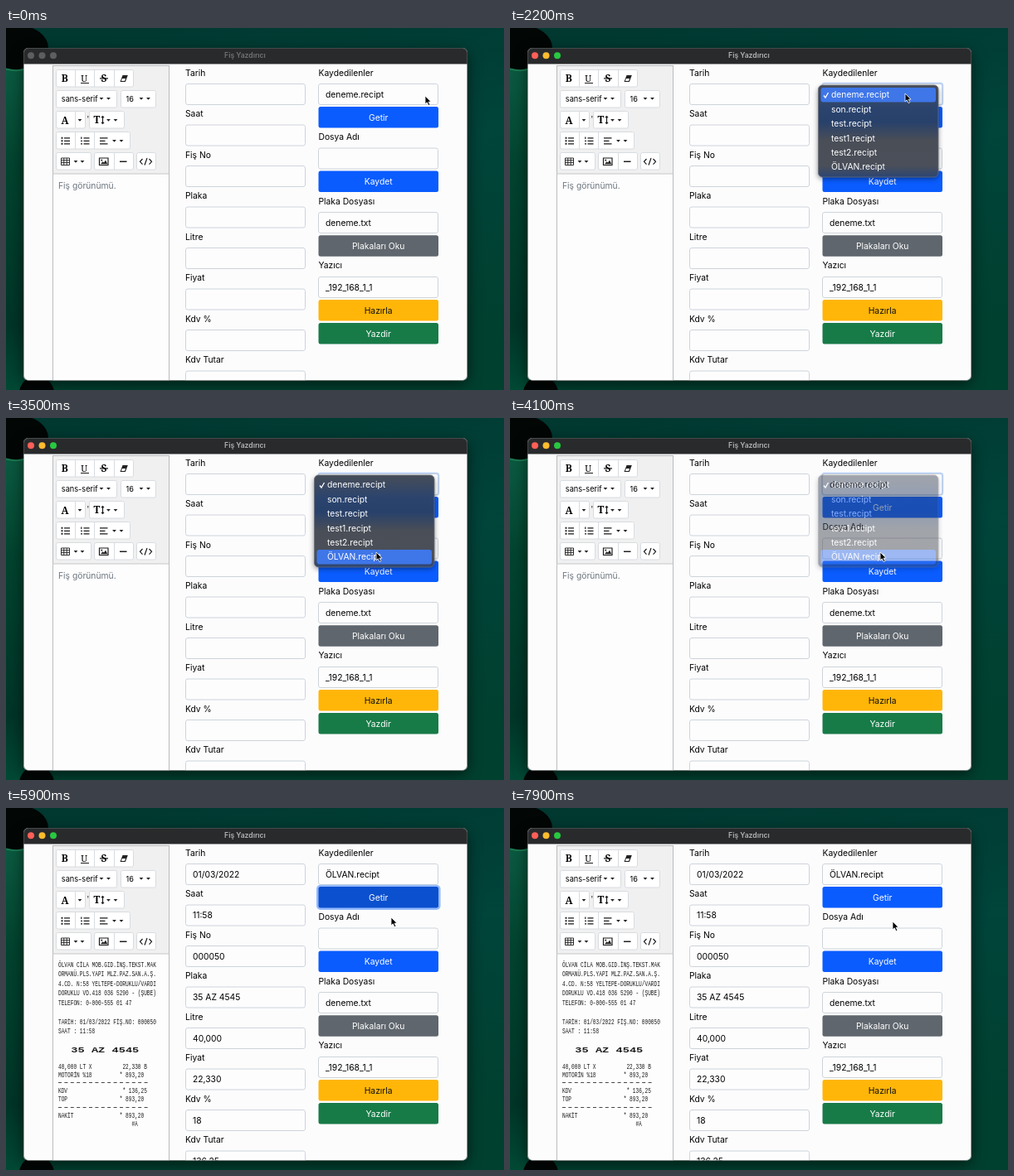
Recreate the animation shown at these times as an HTML page. Size 600 by 437 pixels, loop 8 s.

```html
<!DOCTYPE html>
<html lang="tr">
<head>
<meta charset="utf-8">
<style>
  html, body { margin: 0; width: 100%; height: 100%; overflow: hidden; background: #013a30; }
  svg { display: block; font: 10.3px Inter, sans-serif; }
  .field { fill: #fdfdfe; stroke: #ced4da; }
  .tool { fill: #fff; stroke: #d8dce0; }
  .icon { fill: none; stroke: #1c1c1c; stroke-width: 1.2; }
  .serif { font: bold 12px "Noto Serif", serif; }
  .receipt { font: 8.3px "Liberation Mono", monospace; fill: #1c1c1c; white-space: pre; }
</style>
</head>
<body>
<svg id="stage" width="600" height="437" viewBox="0 0 600 437"></svg>
<script>
const text = (x, y, s, attrs = '') => `<text x="${x}" y="${y}" ${attrs}>${s}</text>`;
const rect = (x, y, w, h, attrs = '') => `<rect x="${x}" y="${y}" width="${w}" height="${h}" ${attrs}/>`;
const path = (d, attrs = 'class="icon"') => `<path d="${d}" ${attrs}/>`;
const field = (x, y, value = '', id = '') =>
  rect(x + .5, y + .5, 144, 25, 'class="field" rx="2.5"') + text(x + 9, y + 16.7, value, id && `id="${id}"`);
const button = (y, label, fill, ink = '#fff', id = '') =>
  rect(376.5, y, 144.5, 25.5, `rx="2.5" fill="${fill}" ${id && `id="${id}"`}`) +
  text(448.7, y + 16.5, label, `fill="${ink}" text-anchor="middle"`);
const tools = (x, y, w, dividers = []) => rect(x + .5, y + .5, w, 20.5, 'class="tool" rx="2"') +
  dividers.map(d => path(`M${d + .5} ${y + .5}v20.5`, 'stroke="#d8dce0"')).join('');
const caret = (x, y) => path(`M${x - 2.4} ${y - 1}h4.8l-2.4 2.7z`, 'fill="#222"');

const background = `
  <defs>
    <linearGradient id="wall" x2=".25" y2="1">
      <stop stop-color="#01372f"/><stop offset=".5" stop-color="#00443a"/><stop offset="1" stop-color="#00402f"/>
    </linearGradient>
    <linearGradient id="strip" x2="0" y2="1">
      <stop stop-color="#0b5a41"/><stop offset=".3" stop-color="#02442f"/>
      <stop offset=".8" stop-color="#003527"/><stop offset="1" stop-color="#014934"/>
    </linearGradient>
    <linearGradient id="glass" x2="0" y2="1">
      <stop stop-color="#474d58"/><stop offset=".25" stop-color="#2b446e"/><stop offset=".4" stop-color="#28416b"/>
      <stop offset=".6" stop-color="#494e57"/><stop offset=".88" stop-color="#4a4f59"/><stop offset="1" stop-color="#2c4574"/>
    </linearGradient>
    <filter id="shadow" x="-20%" y="-20%" width="140%" height="140%"><feGaussianBlur stdDeviation="9"/></filter>
    <filter id="soft" x="-20%" y="-20%" width="140%" height="140%"><feGaussianBlur stdDeviation="3"/></filter>
    <clipPath id="frame">${rect(21, 24, 535, 401.5, 'rx="6"')}</clipPath>
  </defs>
  ${rect(0, 0, 600, 437, 'fill="url(#wall)"')}
  ${rect(0, 48, 24, 389, 'fill="url(#strip)"')}
  <ellipse cx="15" cy="24" rx="36" ry="27" fill="#020605"/>
  ${path('M0 49.5Q14 53 24 49', 'fill="none" stroke="#1c7a52" stroke-width="2"')}
  <circle cx="37" cy="441" r="21" fill="#020605"/>
  ${rect(21, 30, 535, 400, 'rx="8" fill="#000" opacity=".55" filter="url(#shadow)"')}`;

const titleBar = rect(21, 24, 535, 19.5, 'fill="#292a2c"') +
  [30, 43.5, 57].map(x => `<circle class="light" cx="${x}" cy="33.3" r="4"/>`).join('') +
  text(288, 36.4, 'Fiş Yazdırıcı', 'id="title" text-anchor="middle" font-size="8.6" font-weight="600"');

const bars = (x, y, w, last = w) => path(`M${x} ${y - 3.5}h${w}M${x} ${y}h${last}M${x} ${y + 3.5}h${w}`);
const editor =
  rect(56.5, 45.5, 140, 390, 'fill="#fdfdfe" stroke="#b9bbbd"') +
  rect(57, 46, 139, 130, 'fill="#f0f0f1"') + path('M56 176h141', 'stroke="#c4c6c8"') +
  tools(60, 50, 93, [83, 106, 130]) + tools(60, 75, 73) + tools(138, 75, 42) +
  tools(60, 100, 35, [83]) + tools(100, 100, 42) + tools(60, 125, 89, [83, 106]) +
  tools(60, 150, 42) + tools(106, 150, 47, [130]) + tools(157, 150, 23) +
  text(66.8, 65, 'B', 'class="serif"') +
  text(90.3, 64.5, 'U', 'class="serif" style="font-weight:500;font-size:11px"') + path('M90 66.5h10') +
  text(114.5, 65, 'S', 'class="serif"') + path('M113 60.8h10') +
  path('M140.5 57h6.3l-3 8h-6.3z', 'fill="#222"') + path('M139.5 62.3l.5-1.4h4l-1 3.1h-4z', 'fill="#fff"') +
  text(66.8, 88.7, 'sans-serif', 'font-size="9.2"') + text(144.5, 88.7, '16', 'font-size="9.2"') +
  text(66.5, 115.5, 'A', 'class="serif"') + text(97.6, 113, "'", 'font-size="9"') +
  text(105.5, 115, 'T', 'class="serif"') + path('M116.5 107v8M115 108.2l1.5-1.6 1.5 1.6M115 113.8l1.5 1.6 1.5-1.6') +
  bars(70, 136.3, 7) + path('M66.5 132.8h2M66.5 136.3h2M66.5 139.8h2', 'stroke="#222" stroke-width="2"') +
  bars(93.5, 136.3, 7) + path('M90.8 131.5v2.6M90 136.3h2M90 139.8h2') +
  bars(113, 136.3, 9.5, 6.5) +
  path('M66.5 157h10v8.5h-10zM66.5 159.8h10M66.5 162.6h10M69.8 157v8.5M73.2 157v8.5', 'class="icon" style="stroke-width:.9"') +
  path('M112.5 157h10.5v8.5h-10.5z') + path('M114 164.3l2.5-3 1.5 1.3 2-3 2.3 4.7zM114.4 158.8h1.8v1.8h-1.8z', 'fill="#222"') +
  path('M137 161.3h8.5', 'stroke="#222" stroke-width="1.6"') +
  path('M164.5 158l-3 3.3 3 3.3M172.5 158l3 3.3-3 3.3M170 157l-3 8.5') +
  [[115, 85], [123.5, 85], [163, 85], [171.5, 85], [89, 111], [123.5, 111], [132, 111],
   [130.5, 136], [139, 136], [84, 161], [92, 161]].map(p => caret(...p)).join('');

const headLines = ['ÖLVAN CİLA MOB.GID.İNŞ.TEKST.MAK', 'ORMANÜ.PLS.YAPI MLZ.PAZ.SAN.A.Ş.',
  '4.CD. N:58 YELTEPE-DORUKLU/VARDI', 'DORUKLU VD.418 036 5290 - (ŞUBE)', ' TELEFON: 0-000-555 01 47', '',
  'TARİH: 01/03/2022 FİŞ.NO: 000050', 'SAAT : 11:58'];
const sums = [[315, '40,000 LT X', '22,330 B', 29], [325, 'MOTORİN %18', '* 893,20', 28], [344.5, 'KDV', '* 136,25', 29],
  [354.5, 'TOP', '* 893,20', 28], [374, 'NAKİT', '* 893,20', 28], [384, '', '#A', 26]];
const receipt = `<g id="receipt"><g class="receipt" transform="translate(63) scale(.74 1)">
  ${headLines.map((s, i) => text(0, 192 + i * 11.5, s)).join('')}
  ${sums.map(([y, label, value, end]) => text(0, y, label) + text(end * 4.98, y, value, 'text-anchor="end"')).join('')}</g>
  <g class="receipt" transform="translate(78.3) scale(1.52 1)">${text(0, 295, '35 AZ 4545', 'style="font-size:9px;font-weight:bold"')}</g>
  ${path('M63 331.5h108M63 361.5h108', 'stroke="#333" stroke-width=".9" stroke-dasharray="4 3.4"')}</g>`;

const fields = [['Tarih', '01/03/2022'], ['Saat', '11:58'], ['Fiş No', '000050'], ['Plaka', '35 AZ 4545'],
  ['Litre', '40,000'], ['Fiyat', '22,330'], ['Kdv %', '18'], ['Kdv Tutar', '136,25']];
const form = fields.map(([label, value], i) =>
  text(216, 57.6 + i * 49.5, label) + field(216, 67 + i * 49.5, value, `value${i}`)).join('');

const blue = '#0a5cff';
const side = ['Kaydedilenler', 'Dosya Adı', 'Plaka Dosyası', 'Yazıcı'].map((s, i) => text(376.5, 57.6 + i * 77.6, s)).join('') +
  rect(375.2, 65.7, 147, 28, 'id="selectRing" rx="4" fill="#b5d0fd"') +
  field(376, 67, 'deneme.recipt', 'choice') +
  rect(374, 92.7, 149.5, 30.2, 'id="buttonRing" rx="5" fill="#93b9fb"') +
  button(95, 'Getir', blue, '#fff', 'fetch') + field(376, 144.5) + button(172.6, 'Kaydet', blue) +
  field(376, 222, 'deneme.txt') + button(250.2, 'Plakaları Oku', '#5f666d') +
  field(376, 300, '_192_168_1_1') + button(328, 'Hazırla', '#ffb608', '#111') + button(356, 'Yazdir', '#177b47');

const options = ['deneme', 'son', 'test', 'test1', 'test2', 'ÖLVAN'].map(s => s + '.recipt');
const popup = `<g id="popup">
  ${rect(371, 72, 145, 110, 'rx="5" opacity=".45" filter="url(#soft)"')}
  ${rect(371.5, 69, 144.5, 111, 'rx="5" fill="url(#glass)" stroke="#686d76" stroke-width=".8"')}
  ${rect(374.5, 0, 138.5, 17.4, 'id="highlight" rx="3" fill="#3f76e8"')}
  ${path('M378 81.5l2 2.5 3.5-6', 'fill="none" stroke="#fff" stroke-width="1.3"')}
  ${options.map((s, i) => text(387, 84.4 + i * 17.4, s, 'fill="#fff"')).join('')}</g>`;

const cursor = path('M0 0v9.8l2.3-2 1.7 3.8 1.8-.8-1.7-3.7h3z', 'id="cursor" stroke="#fff" stroke-width=".8"');

const byId = id => document.getElementById(id);
byId('stage').innerHTML = background + `<g clip-path="url(#frame)">
  ${rect(21, 24, 535, 402, 'fill="#fcfcfd"')}${titleBar}${editor}
  ${text(63, 194.3, 'Fiş görünümü.', 'id="hint" fill="#6c757d"')}${receipt}${form}${side}</g>
  ${rect(21.5, 24.5, 534, 401, 'rx="6" fill="none" stroke="#56615e" stroke-opacity=".6"')}` + popup + cursor;

const set = (id, name, value) => byId(id).setAttribute(name, value);
const show = (id, on) => set(id, 'opacity', +on);
const moves = [[0, 505, 82], [1000, 505, 82], [1400, 476, 79], [2300, 476, 79], [3200, 446, 162], [4400, 446, 162],
  [5000, 460, 110], [5500, 460, 110], [5800, 464, 132], [6800, 464, 132], [7100, 461, 137], [8000, 461, 137]];

function pointer(t) {
  const i = moves.findIndex(m => m[0] > t);
  const [t0, x0, y0] = moves[i - 1], [t1, x1, y1] = moves[i];
  const p = (t - t0) / (t1 - t0), e = p * p * (3 - 2 * p);
  return [x0 + (x1 - x0) * e, y0 + (y1 - y0) * e];
}

function draw(now) {
  const t = Math.floor(now % 8000 / 100) * 100;
  const active = t >= 600, filled = t >= 5500, focused = filled && t < 6900;
  const [x, y] = pointer(t);
  document.querySelectorAll('.light').forEach((light, i) =>
    light.setAttribute('fill', active ? ['#fe5f57', '#febc2e', '#28c840'][i] : '#5d5e60'));
  set('title', 'fill', active ? '#b3b4b5' : '#727375');
  set('cursor', 'transform', `translate(${x} ${y})`);
  const row = Math.max(0, Math.min(5, Math.floor((y - 72) / 17.4)));
  set('highlight', 'y', 72 + row * 17.4);
  show('popup', t < 1800 ? 0 : Math.max(0, Math.min(1, (4300 - t) / 400)));
  show('selectRing', t >= 1800 && !filled);
  byId('choice').textContent = options[t < 4300 ? 0 : 5];
  show('buttonRing', focused);
  set('fetch', 'fill', focused ? '#0b50cf' : blue);
  show('hint', !filled);
  show('receipt', filled);
  fields.forEach((_, i) => show(`value${i}`, filled));
  requestAnimationFrame(draw);
}
requestAnimationFrame(draw);
</script>
</body>
</html>
```
